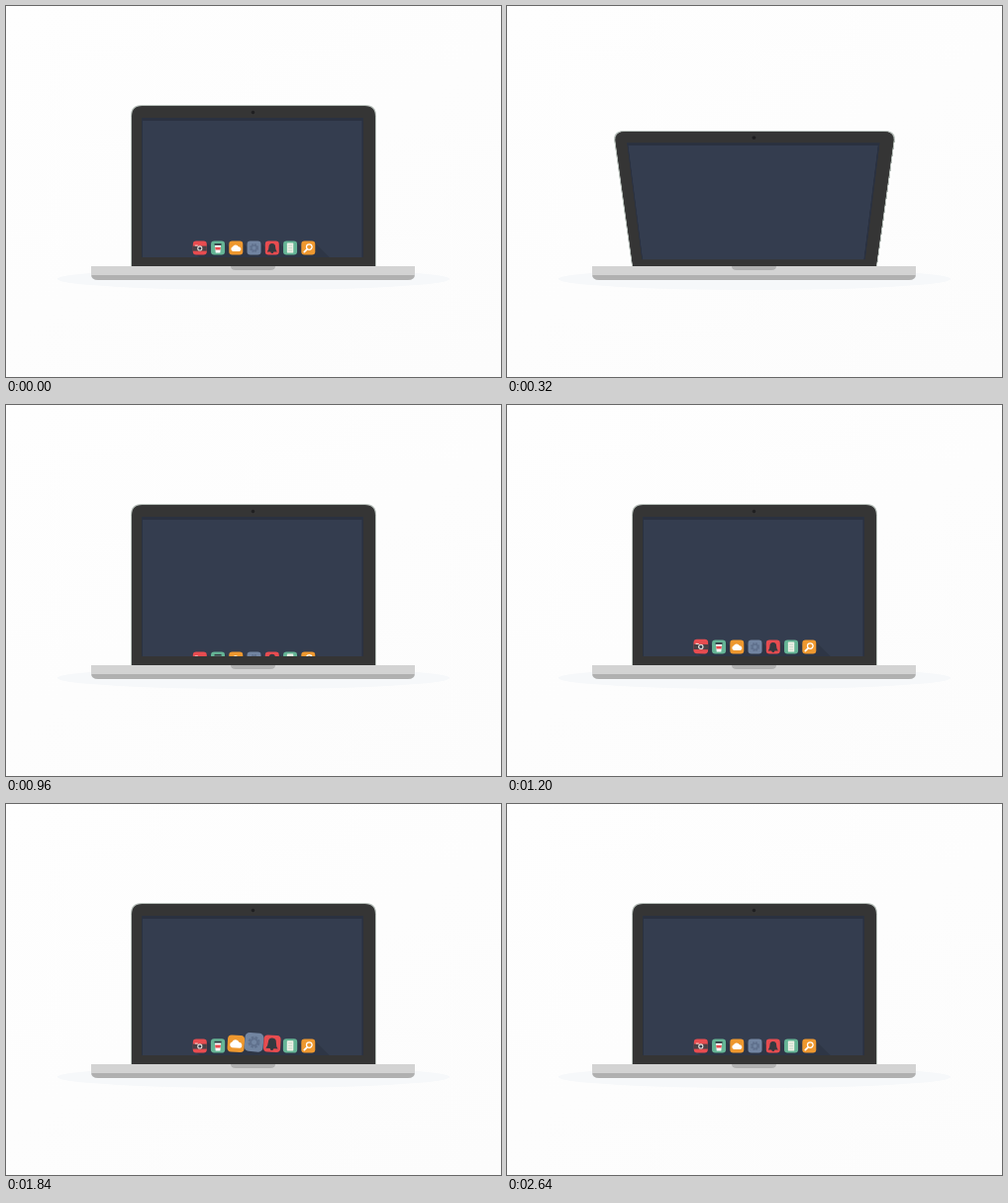
These frames come from a looping animation (500 px wide and 375 px high, 3.44 s). An HTML page:

```html
<!DOCTYPE html>
<html>
<head>
<meta charset="utf-8">
<style>
  html, body { margin: 0; width: 100%; height: 100%; overflow: hidden; }
  body { position: relative; background: linear-gradient(150deg, #fefefe, #fcfcfc); }
  .stage { position: absolute; left: 0; top: 0; width: 500px; height: 375px; perspective: 737px; perspective-origin: 250px 182px; }
  svg { position: absolute; left: 0; top: 0; display: block; }
  #lid { transform-origin: 250px 263px; }
</style>
</head>
<body>
<svg width="500" height="375"><ellipse cx="250" cy="276" rx="198" ry="11" fill="#f6f8fa"/></svg>

<div class="stage">
  <svg id="lid" width="500" height="375">
    <defs>
      <clipPath id="screen"><rect x="137" y="113" width="224" height="141"/></clipPath>
    </defs>
    <path d="M126 264V111Q126 100 137 100H363Q374 100 374 111V264Z" fill="#b8c0bb"/>
    <path d="M127 264V111.500Q127 101 137.500 101H362.500Q373 101 373 111.500V264Z" fill="#353535"/>
    <circle cx="249.500" cy="107.500" r="1.700" fill="#1e1e20"/>
    <rect x="137" y="113" width="224" height="141" fill="#2a3140"/>
    <rect x="138" y="116" width="221.500" height="138" fill="#343d4f"/>
    <g id="dock" clip-path="url(#screen)"></g>
  </svg>
</div>

<svg width="500" height="375">
  <path d="M86 263H413V271Q413 277 406 277H93Q86 277 86 271Z" fill="#b0b0b0"/>
  <path d="M86 263H413V272H86Z" fill="#d3d3d3"/>
  <path d="M227 263H272Q272 267 267 267H232Q227 267 227 263Z" fill="#b0b0b0"/>
</svg>

<script>
const LOOP = 3440, STEP = 80;
const RED = '#e84c50', TEAL = '#65b495', ORANGE = '#ee982f', SLATE = '#7285a1';

// Glyphs are drawn around the centre of a 14 px tile.
const icons = [
  [RED, `<path d="M-7-2H7V3H-7Z" fill="#4a4146"/><path d="M-5-3H-2V-2H-5Z" fill="#f3dfd8"/>
    <circle r="2.600" cy=".3" fill="#e6e1dc"/><circle r="1.500" cy=".3" fill="#343d4f"/>`],
  [TEAL, `<path d="M-3-3H3L2.300 5H-2.300Z" fill="#fff"/><path d="M-3.500-4.500H3.500V-2.700H-3.500Z" fill="#343b45"/>
    <path d="M-2.800-.8H2.800L2.500 2H-2.500Z" fill="#e84c50"/>`],
  [ORANGE, `<path d="M-3 3.500A2.500 2.500 0 0 1-3.300-1.300A3.200 3.200 0 0 1 2.500-1.300A2.500 2.500 0 0 1 3.500 3.500Z" fill="#fff"/>`],
  [SLATE, `<circle r="3.500" fill="none" stroke="#60718d" stroke-width="2" stroke-dasharray="1.900 .85"/>
    <circle r="2.500" fill="none" stroke="#60718d" stroke-width="1.300"/>`],
  [RED, `<path d="M-5 4Q-3.300 2-3.300-1Q-3.300-4.700 0-4.700Q3.300-4.700 3.300-1Q3.300 2 5 4Z" fill="#343940"/>
    <circle cy="4" r="1.500" fill="#343940"/>`],
  [TEAL, `<rect x="-3.200" y="-5" width="6.400" height="10" rx=".6" fill="#eef1e6"/>
    <path d="M-2-2.500H2M-2 0H2M-2 2.500H2" stroke="#b6cdbd" stroke-width=".7"/>`],
  [ORANGE, `<circle cx="1" cy="-1" r="2.800" fill="none" stroke="#fff" stroke-width="1.300"/>
    <path d="M-1.200 1.200L-4 4" stroke="#fff" stroke-width="1.700" stroke-linecap="round"/>`]
];

const lid = document.getElementById('lid');
const dock = document.getElementById('dock');
const shadow = '<path d="M6-6L26 14H8L-6 6Z" fill="#2e3646"/>';
const tile = ([color, glyph]) =>
  `<g class="tile"><rect x="-7" y="-7" width="14" height="14" rx="3.300" fill="${color}"/>${glyph}</g>`;
dock.innerHTML = icons.map(() => `<g class="shade">${shadow}</g>`).join('') + icons.map(tile).join('');
const shades = dock.querySelectorAll('.shade');
const tiles = dock.querySelectorAll('.tile');

function lidOpening(t) {
  if (t < 80 || t >= 640) return 1;
  return (1 - Math.cos(Math.PI * (t + 87) / 734)) / 2;
}

function dockDrop(t) {
  if (t < 80) return 0;
  const p = Math.min(1, Math.max(0, (t - 880) / 320));
  return 21 * (1 - p) ** 2;
}

// A bump of magnification travels along the dock from left to right.
function magnify(index, t) {
  const distance = Math.abs(index - 0.6 - (t - 1520) / 133);
  return distance < 2.4 ? Math.cos(Math.PI * distance / 4.8) ** 2 : 0;
}

function draw(t) {
  lid.style.transform = `rotateX(${90 * (lidOpening(t) - 1)}deg)`;
  dock.style.display = t >= 80 && t < 960 ? 'none' : '';
  icons.forEach((_, i) => {
    const m = magnify(i, t);
    const x = 195.8 + 18.25 * i;
    const y = 244.6 + dockDrop(t) - 3.8 * m;
    const move = `translate(${x} ${y})`;
    shades[i].setAttribute('transform', move);
    tiles[i].setAttribute('transform', `${move} rotate(${5 * m}) scale(${1 + 0.35 * m})`);
  });
}

function tick() {
  const t = performance.now() % LOOP;
  draw(Math.floor(t / STEP) * STEP);
  requestAnimationFrame(tick);
}
tick();
</script>
</body>
</html>
```
